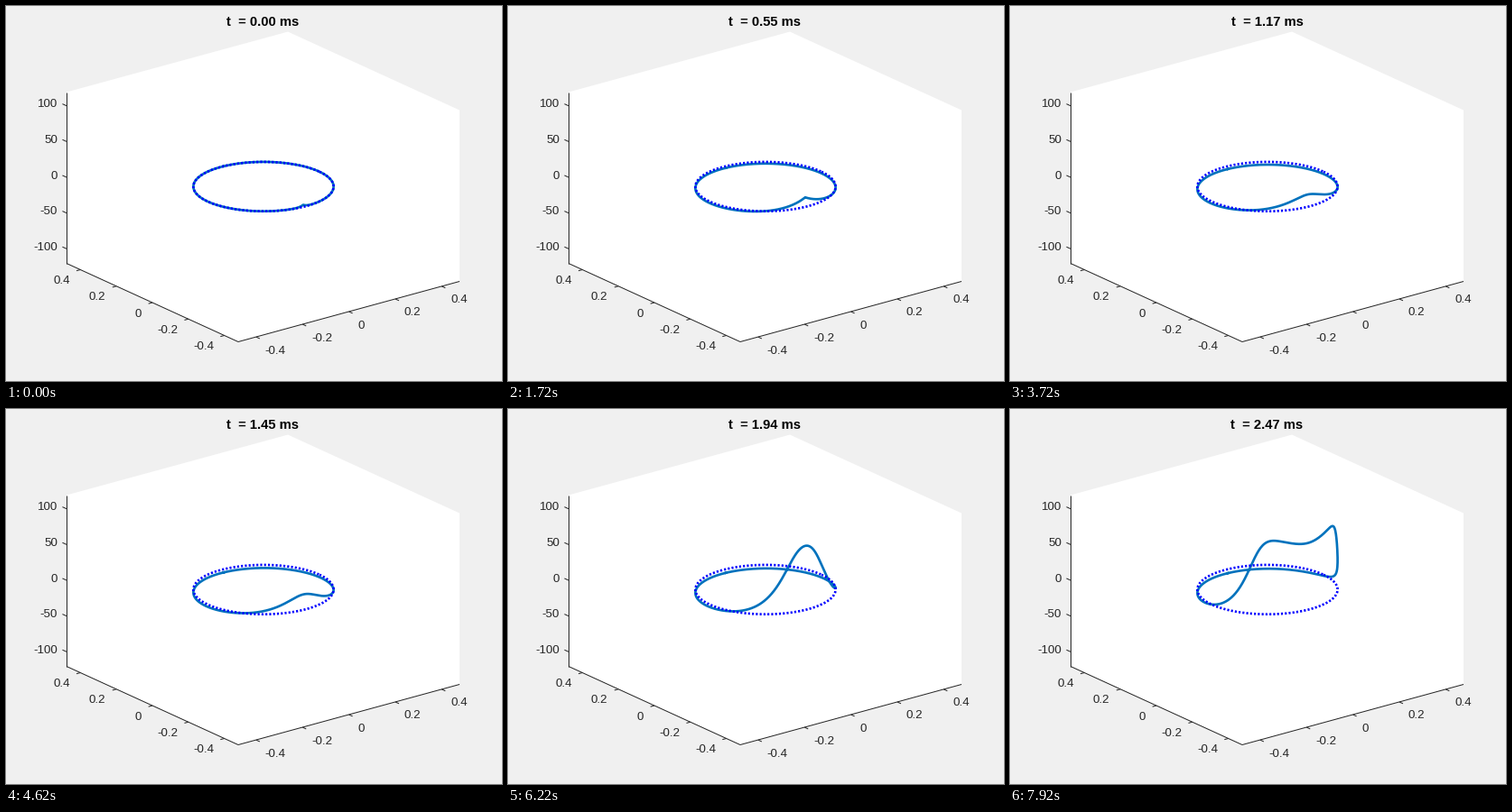
A matplotlib script for the animation above (8000 ms loop, 549 px wide and 416 px high).

```python
import numpy as np
import matplotlib.pyplot as plt
from matplotlib.animation import FuncAnimation

W, H, DPI = 549, 416, 100
PX = 72 / DPI                      # points per pixel
TICK_MS, LOOP_MS = 20, 8000
INK = "#262626"

plt.rcParams["font.family"] = "Liberation Sans"
fig = plt.figure(figsize=(W / DPI, H / DPI), dpi=DPI, facecolor="#f0f0f0")
ax = fig.add_axes([0, 0, 1, 1])
ax.set_xlim(0, W)
ax.set_ylim(H, 0)
ax.axis("off")

# Projected box corners
LEFT, FRONT, RIGHT = np.array([[67, 285.5], [257, 372.5], [502, 305.5]])
UP = np.array([0, -190])
BACK = LEFT + RIGHT - FRONT
LIMIT = 0.477                      # half range of the horizontal axes
Z_PX = 0.793                       # pixels per millivolt


def line(p, q):
    ax.plot(*zip(p, q), color=INK, lw=PX, solid_capstyle="butt")


def tick(pos, step, text, offset, align):
    line(pos, pos + step)
    x, y = pos + offset
    ax.text(x, y + 4.2, text, size=13.33 * PX, color=INK, ha=align, va="baseline")


def unit(v):
    return v / np.hypot(*v)


ax.fill(*zip(LEFT, FRONT, RIGHT, RIGHT + UP, BACK + UP, LEFT + UP), color="white", lw=0)
for p, q in ((LEFT, LEFT + UP), (LEFT, FRONT), (FRONT, RIGHT)):
    line(p, q)

x_out, y_out = unit(FRONT - LEFT), unit(FRONT - RIGHT)
for v in (-0.4, -0.2, 0, 0.2, 0.4):
    f = (v / LIMIT + 1) / 2
    tick(FRONT + f * (RIGHT - FRONT), 4.5 * x_out, f"{v:g}", (10, 14.3), "left")
    tick(FRONT + f * (LEFT - FRONT), 4.5 * y_out, f"{v:g}", (-11.7, 11.5), "right")
for v in range(-100, 101, 50):
    tick(np.array([LEFT[0], 190 - Z_PX * v]), -5 * x_out, str(v), (-10, -2.4), "right")

# Ring and membrane voltage
CX, CY, RX, RY = 285, 200.3, 77.6, 27.4
SITE = -55.5                       # stimulated point, degrees
START = 37.8                       # where the ring begins on screen, degrees
offset = np.linspace(-180, 180, 721)
dist = np.abs(offset)


def ring(degrees):
    a = np.radians(degrees)
    return CX + RX * np.cos(a), CY - RY * np.sin(a)


ring_x, ring_y = ring(SITE + offset)


def spike(s):
    """Action potential at one site, s ms after half height."""
    rise = (1 + np.exp(-(s - 0.159) / 0.072)) ** -0.3
    fall = 1 - 0.38 * 0.06 * np.logaddexp(0, (s - 0.32) / 0.06)
    return 110 * rise * fall


def passive(t):
    """Local response to the current pulse, which stops at 1 ms."""
    u = max(t - 1, 0)
    t = t + 0.02
    peak = 20.5 * np.sqrt(min(t, 1)) * np.exp(-1.1 * u)
    blur = 25 * np.sqrt(u)
    return peak * np.exp(-(np.hypot(dist, blur) - blur) / (25.5 * np.sqrt(t)))


def voltage(t):
    rest = -6.5 * (1 - np.exp(-t / 1.2))
    delay = np.hypot(0.26, dist / 58) - 0.26
    return rest + passive(t) + spike(t - 1.79 - delay)


wave, = ax.plot([], [], color=(0, 114 / 255, 189 / 255), lw=2.67 * PX)
ax.plot(*ring(START + np.linspace(0, 360, 400)), color="#0000ff",
        lw=2.67 * PX, ls=(0, (0.8, 0.8)), dash_capstyle="butt")
title = ax.text(284.5, 22, "", size=14.8 * PX, weight="bold", color="black",
                ha="center", va="baseline")


def update(k):
    ms = k * TICK_MS
    n = ms // 100 if ms < 1320 else (ms + 80) // 100   # one short step
    t = np.floor(n * 3.088) / 100
    wave.set_data(ring_x, ring_y - Z_PX * voltage(t))
    title.set_text(f"t  = {t:.2f} ms")
    return wave, title


anim = FuncAnimation(fig, update, frames=LOOP_MS // TICK_MS, interval=TICK_MS,
                     repeat=True, repeat_delay=0)
plt.show()
```
